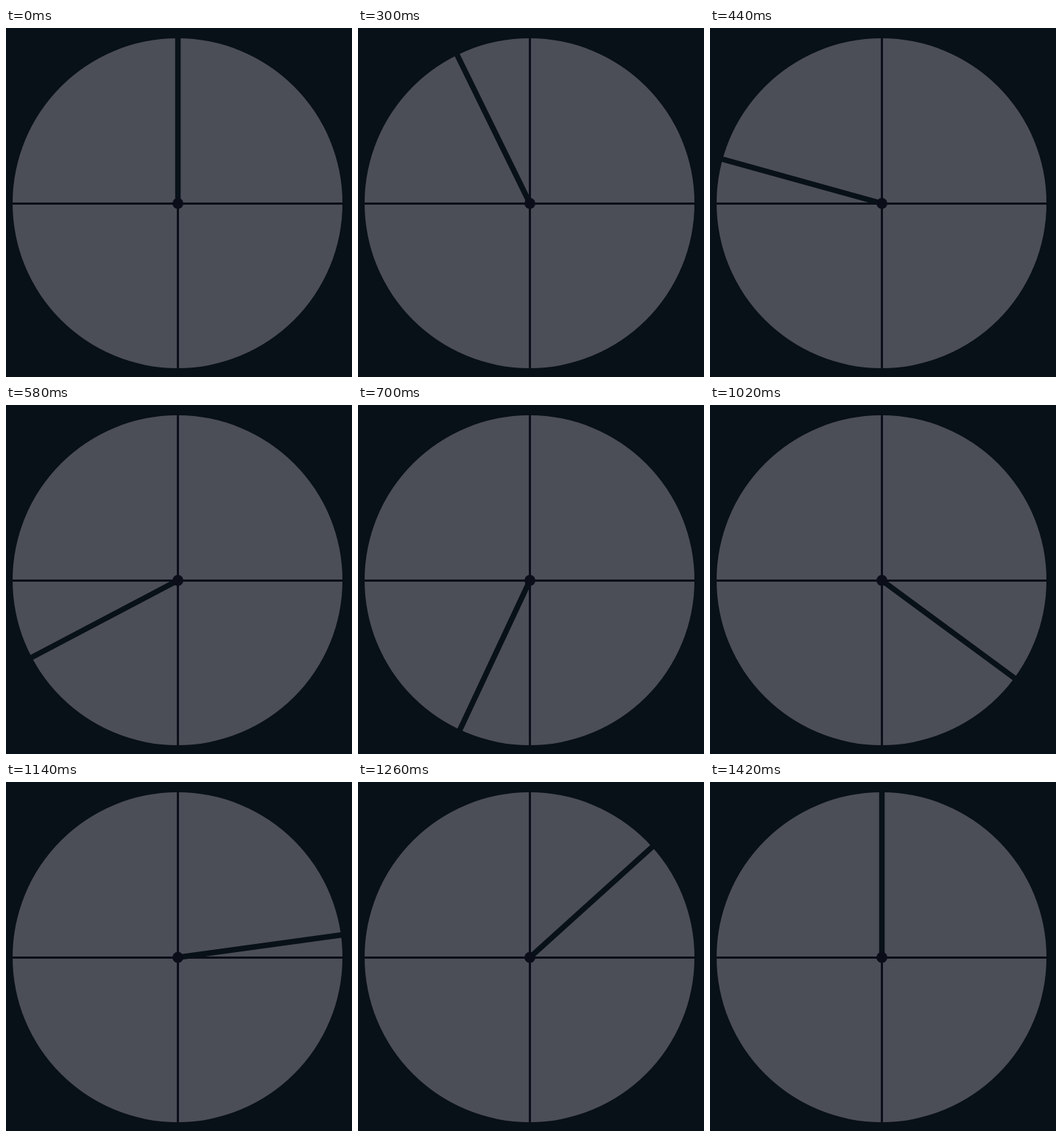
An HTML page with a canvas for the animation above (1780 ms loop, 472x476 px).

```html
<!DOCTYPE html>
<html lang="en">
<head>
<meta charset="utf-8">
<title>Dial</title>
<style>
  html, body { margin: 0; width: 100%; height: 100%; overflow: hidden; background: #081018; }
  canvas { display: block; }
</style>
</head>
<body>
<canvas id="dial" width="472" height="476"></canvas>
<script>
const ctx = document.getElementById('dial').getContext('2d');
const LOOP = 1780;
const TICK = 40;
const BACK = '#081018', FACE = '#4c4e57', INK = '#0b0e18';
const CX = 234.5, CY = 239.25, RADIUS = 225;

// Start time in ms, counterclockwise angle in degrees, whether the hand ticks onward.
const stages = [
  [0, 0, false],
  [220, 2.2, true],
  [300, 26.1, true],
  [440, 74.5, false],
  [500, 93, true],
  [700, 154.9, false],
  [780, 166, true],
  [900, 202.1, false],
  [960, 221, true],
  [1140, 277.8, true],
  [1300, 323.5, false],
  [1380, 347.8, false],
  [1420, 360, false]
];

function handAngle(time) {
  const i = stages.findLastIndex(stage => stage[0] <= time);
  const [start, angle, ticking] = stages[i];
  if (!ticking) return angle;
  const [end, nextAngle] = stages[i + 1];
  const elapsed = Math.floor((time - start) / TICK) * TICK;
  return angle + (nextAngle - angle) * elapsed / (end - start);
}

function disc(x, y, r, color) {
  ctx.fillStyle = color;
  ctx.beginPath();
  ctx.arc(x, y, r, 0, Math.PI * 2);
  ctx.fill();
}

function line(x1, y1, x2, y2, width, color) {
  ctx.strokeStyle = color;
  ctx.lineWidth = width;
  ctx.beginPath();
  ctx.moveTo(x1, y1);
  ctx.lineTo(x2, y2);
  ctx.stroke();
}

function draw(time) {
  ctx.fillStyle = BACK;
  ctx.fillRect(0, 0, 472, 476);
  disc(234, 239, RADIUS, FACE);
  line(234.5, 14, 234.5, 464, 3, INK);
  line(9, 239.5, 459, 239.5, 3, INK);

  const a = handAngle(time) * Math.PI / 180;
  const reach = RADIUS + 1;
  line(CX, CY, CX - Math.sin(a) * reach, CY - Math.cos(a) * reach, 7.5, BACK);
  disc(CX, CY, 7.5, INK);
}

const begin = performance.now();
function frame() {
  draw((performance.now() - begin) % LOOP);
  requestAnimationFrame(frame);
}
frame();
</script>
</body>
</html>
```
